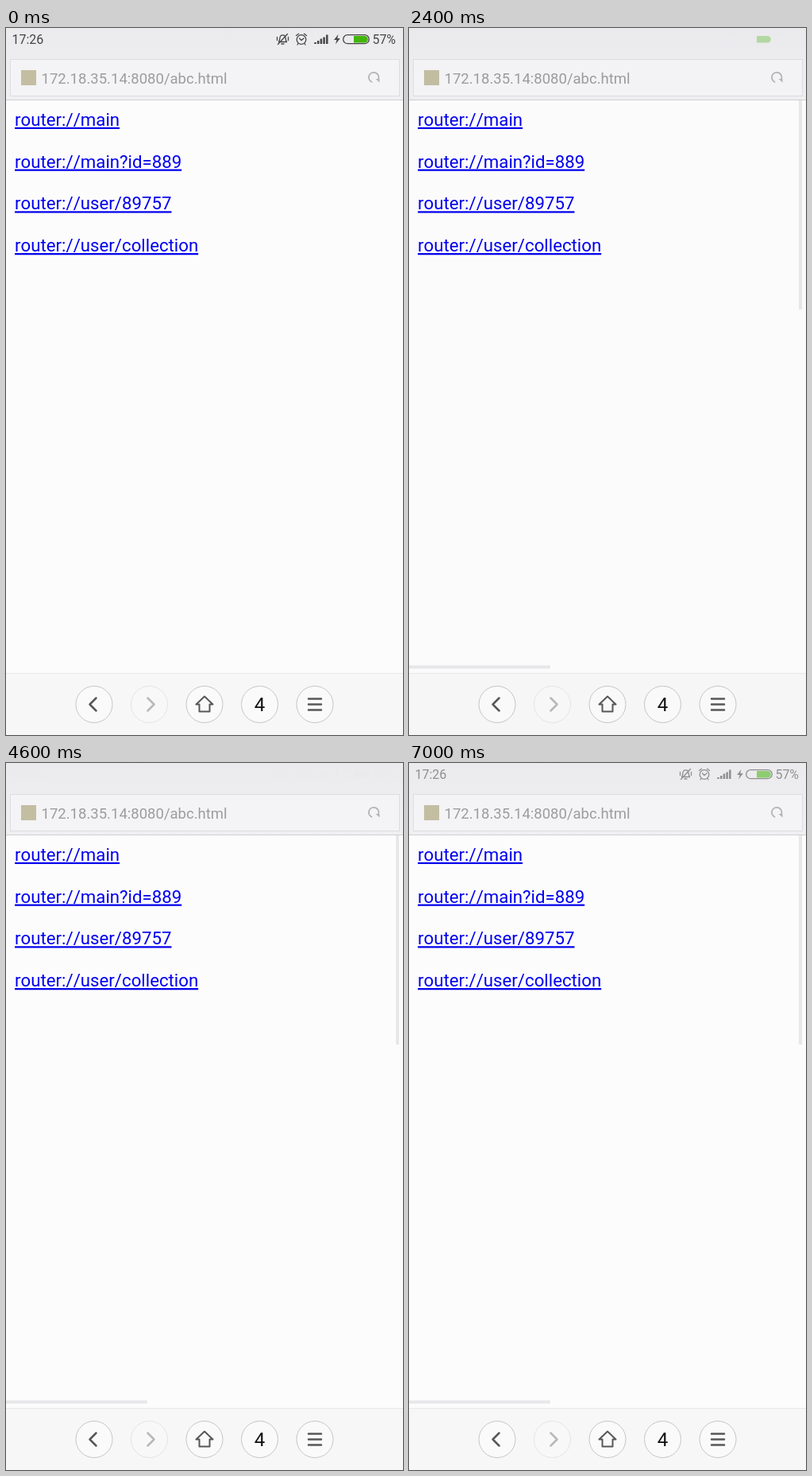
An HTML page for the animation above (7050 ms loop, 500 px wide and 889 px high).

```html
<!DOCTYPE html>
<html lang="en">
<head>
<meta charset="utf-8">
<title>Router links</title>
<style>
  html, body { margin: 0; width: 100%; height: 100%; overflow: hidden; background: #fdfcfd; }
  svg { display: block; width: 500px; height: 889px; font-family: Roboto, sans-serif; }
  text { white-space: pre; }
  .link, .address { font-kerning: none; }
  .link { font-size: 22.22px; fill: #00e; text-decoration: underline 1.3px; text-decoration-skip-ink: none; }
  .link.hit { fill: #e60000; }
  .address { font-size: 18.52px; fill: #9d9c9e; }
  .note { font-size: 19.44px; fill: #6b6a6c; }
  .row { font-size: 13.89px; fill: #2b2b2d; }
  .line { fill: none; stroke-linecap: round; stroke-linejoin: round; }
  .tool { stroke: #57575a; stroke-width: 2.5; }
  .thin { stroke-width: 2; }
  .ring { fill: #fafafb; stroke: #c6c6c8; }
  .off { opacity: .4; }
</style>
</head>
<body>
<svg viewBox="0 0 500 889">
  <defs>
    <linearGradient id="head" x2="0" y2="1">
      <stop stop-color="#ebeaec"/><stop offset="1" stop-color="#f0eff1"/>
    </linearGradient>
  </defs>

  <g id="browser">
    <rect width="500" height="889" fill="#fdfcfd"/>
    <rect width="500" height="90" fill="url(#head)"/>
    <path d="M0 90.5H500" stroke="#cfced0"/>
    <rect x="5.5" y="39.5" width="490" height="46" fill="#f4f3f5" stroke="#dddcde"/>
    <rect x="19" y="53" width="19" height="19" fill="#c3bda2"/>
    <text class="address" x="44.5" y="69.5">172.18.35.14:8080/abc.html</text>
    <path class="line" d="M460.500 67.800A6.300 6.300 0 1 1 469 64.500" stroke="#b4b3b5" stroke-width="1.800"/>
    <path d="M465.500 64H470.500V68.500Z" fill="#b4b3b5"/>
    <g id="links"></g>
    <g id="bars" fill="#e8e7e9">
      <rect x="491" y="91" width="4" height="263"/>
      <rect y="801.500" width="178" height="4"/>
    </g>
    <rect y="811" width="500" height="78" fill="#f7f7f8"/>
    <path d="M0 811.5H500" stroke="#e9e8ea"/>
    <g id="rings"></g>
    <path class="line tool" d="M113.500 842.500L105.500 850.500L113.500 858.500"/>
    <path class="line tool off" d="M178.500 842.500L186.500 850.500L178.500 858.500"/>
    <path class="line tool thin" d="M250 840.500L239.500 850.500H243.500V859.500H256.500V850.500H260.500Z"/>
    <text x="319.500" y="859" font-size="24" text-anchor="middle" fill="#111">4</text>
    <path class="line tool" d="M381 843.500H397M381 850.500H397M381 857.500H397"/>
    <rect class="dim" width="500" height="889"/>
  </g>

  <g id="list">
    <rect width="500" height="889" fill="#f9f9fb"/>
    <rect width="500" height="28" fill="#2f3c9d"/>
    <g id="rows"></g>
    <rect class="edge" y="28" width="1" height="861" fill="#222"/>
    <rect class="dim" width="500" height="889"/>
  </g>

  <g id="page">
    <rect width="500" height="889" fill="#f9f9fb"/>
    <rect width="500" height="28" fill="#2f3c9d"/>
    <rect class="edge" y="28" width="1" height="861" fill="#222"/>
    <text class="note" id="name" x="20.8" y="71"></text>
    <text class="note" id="info" x="20.8" y="116.800"></text>
  </g>

  <text id="clock" x="7.500" y="20" font-size="16" fill="currentColor">17:26</text>
  <g id="icons">
    <g class="line" stroke="currentColor" stroke-width="1.300">
      <path d="M343.500 17.500H353.500C352 15.500 352.300 13 351.800 11.200C351 8 346 8 345.200 11.200C344.700 13 345 15.500 343.500 17.500ZM347 20H350M342.500 20.500L354.500 7.500M341.500 11.500V15.500M355.500 11.500V15.500"/>
      <circle cx="372" cy="14.500" r="5.800"/>
      <path d="M369.500 13L372 15.500L375 13M365.500 9.500L368.500 7.300M375.500 7.300L378.500 9.500M368 19.500L367 21M376 19.500L377 21"/>
      <rect x="424.700" y="8.700" width="32.500" height="11" rx="5.500"/>
    </g>
    <path d="M389.500 20V18M393.200 20V16M396.900 20V13.500M400.600 20V11.500M404.300 20V8.500" stroke="currentColor" stroke-width="2.500"/>
    <path d="M418.500 8L413 15H416.500L415 20.500L420.800 13H417.300Z" fill="currentColor"/>
    <path d="M438 10H451.500A4.200 4.200 0 0 1 451.500 18.500H438Z" fill="#43b50c"/>
    <text x="461.500" y="20" font-size="15.800" fill="currentColor">57%</text>
  </g>
</svg>

<script>
const LOOP = 7050, SLIDE = 350, WIDTH = 500, DRIFT = 112;

// tap: link pressed, open: page slides in, back: to the list, home: to the browser
const visits = [
  { link: 1, tap: 550, open: 806, back: 1565, home: 2060, name: 'MainActivity', info: 'id=>889=>String' },
  { link: 2, tap: 2850, open: 3031, back: 3790, home: 4200, name: 'UserActivity', info: 'userId=>89757=>String' },
  { link: 3, tap: 5080, open: 5330, back: 6050, home: 6500, name: 'UserCollectionActivity', info: '' }
];
const links = ['main', 'main?id=889', 'user/89757', 'user/collection'];
const rows = [
  'router://main?id=7865&updateTime=53789&web=true&other=i+am+lost',
  'router://home?id=53789&o=you+are+best',
  'http://qelto.com/main?id=888',
  'router://home/somebody?id=123',
  'router://user/qelto',
  'router://user/collection',
  'router://user/collection?id=911',
  'router://user/nickname/city/shanghai/gender/1/age/98',
  'router://user/nickname/city/shanghai/gender/1/age/98?\nage=89&gender=3&nickname=fans',
  'router://user/pemo/noting'
];

const $ = id => document.getElementById(id);
function add(parent, tag, attrs, text = '') {
  const el = document.createElementNS('http://www.w3.org/2000/svg', tag);
  for (const key in attrs) el.setAttribute(key, attrs[key]);
  el.textContent = text;
  return parent.appendChild(el);
}

const linkEls = links.map((path, i) =>
  add($('links'), 'text', { class: 'link', x: 11.1, y: 122.8 + 52.75 * i }, 'router://' + path));

rows.forEach((row, i) => {
  const lines = row.split('\n');
  lines.forEach((line, j) => add($('rows'), 'text', {
    class: 'row', x: 15.4, y: 60.5 + 55.56 * i + 16.3 * (j - (lines.length - 1) / 2)
  }, line));
});

for (let i = 0; i < 5; i++)
  add($('rings'), 'circle', { class: i === 1 ? 'ring off' : 'ring', cx: 111 + 69.5 * i, cy: 850.5, r: 23 });

const clamp = v => Math.min(1, Math.max(0, v));
function slide(t, start) {
  const s = 1 - Math.pow(1 - clamp((t - start) / SLIDE), 1.6);
  return s * s * (3 - 2 * s);
}

function place(id, x, dim, edge) {
  const el = $(id);
  el.setAttribute('transform', `translate(${x.toFixed(2)})`);
  el.style.display = x < WIDTH ? '' : 'none';
  const shade = el.querySelector('.dim'), rim = el.querySelector('.edge');
  if (shade) shade.style.opacity = dim;
  if (rim) rim.style.display = edge ? '' : 'none';
}

// 1 is full dark, -1 full white, fading through nothing
function tint(el, level) {
  el.style.color = level > 0 ? '#464547' : '#eeeef6';
  el.style.opacity = Math.abs(level);
}
function level(t, v, lag) {
  const end = v.home + SLIDE;
  return t < v.home
    ? 1 - 2 * clamp((t - v.open - 120 - lag) / 90)
    : Math.min(1, Math.max(-1, (t - end - 50) / 182));
}

function draw(t) {
  const v = visits.filter(v => t >= v.tap).pop() || visits[0];
  const opened = slide(t, v.open), backed = slide(t, v.back), left = slide(t, v.home);
  const listed = t >= v.back;
  const depth = opened - left;

  place('browser', -DRIFT * depth, 0.585 * (left ? Math.sqrt(depth) : depth));
  place('list', !listed ? WIDTH : left ? WIDTH * left : -DRIFT * (1 - backed),
    0.5 * Math.sqrt(1 - backed), left > 0);
  place('page', WIDTH * (listed ? backed : 1 - opened), 0, listed);

  $('name').textContent = v.name;
  $('info').textContent = v.info;
  linkEls.forEach((el, i) =>
    el.classList.toggle('hit', i === v.link && t >= v.tap && !listed));
  $('bars').style.display = t >= v.home && t < v.home + SLIDE + 300 ? '' : 'none';

  tint($('icons'), level(t, v, 0));
  tint($('clock'), level(t, v, 100));
}

const begin = performance.now();
function tick() {
  draw((performance.now() - begin) % LOOP);
  requestAnimationFrame(tick);
}
tick();
</script>
</body>
</html>
```
